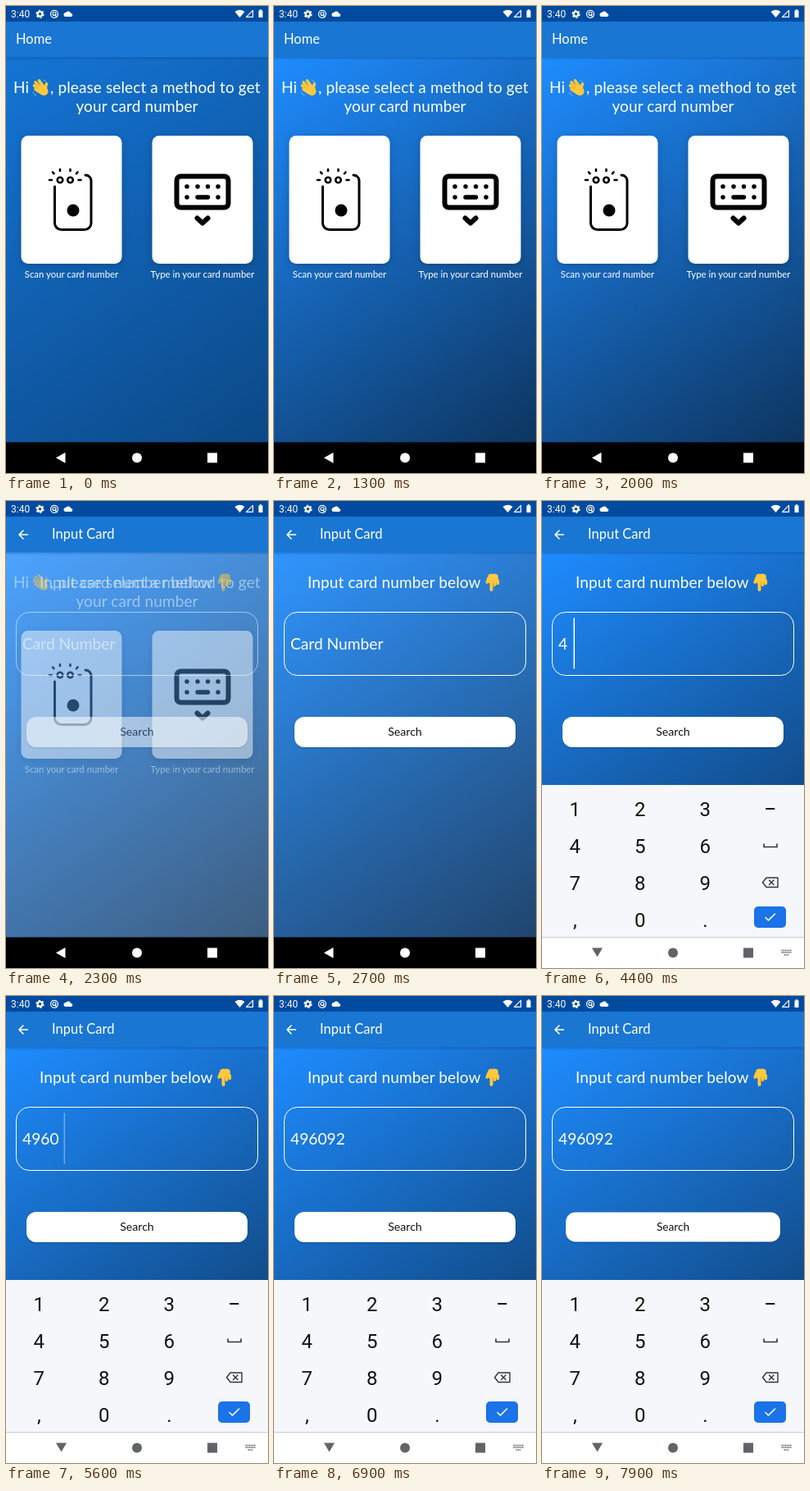
Animation of 320x569 px, one loop 8000 ms. Source, as an HTML page:

```html
<!DOCTYPE html>
<html lang="en">
<head>
<meta charset="utf-8">
<title>Card number input</title>
<style>
  html, body { margin: 0; height: 100%; overflow: hidden; background: #000; }
  svg { display: block; width: 100vw; height: 100vh; font-family: Lato, sans-serif; fill: #fff; }
  .line { fill: none; stroke-linecap: round; stroke-linejoin: round; }
  .title { font-size: 16.5px; }
  .big { font-size: 19px; letter-spacing: .12px; }
  .field { font-size: 19.2px; }
  .small { font-size: 11.4px; text-anchor: middle; }
  .status { font: 12px Roboto, sans-serif; }
  .keys { font: 24px Roboto, sans-serif; fill: #111; text-anchor: middle; }
  .shadow { filter: drop-shadow(0 2px 4px #0003); }
  .low { filter: drop-shadow(0 1px 1px #0003); }
</style>
</head>
<body>
<svg viewBox="0 0 320 569" preserveAspectRatio="none">
  <defs>
    <linearGradient id="sky" gradientUnits="userSpaceOnUse" x1="0" y1="62" x2="320" y2="531">
      <stop stop-color="#1e8cff"/><stop offset="1" stop-color="#0d3560"/>
    </linearGradient>
    <linearGradient id="edge" x2="0" y2="1">
      <stop stop-color="#003" stop-opacity=".2"/><stop offset="1" stop-color="#003" stop-opacity="0"/>
    </linearGradient>
  </defs>

  <rect y="62" width="320" height="470" fill="url(#sky)"/>
  <rect id="dim" y="62" width="320" height="470" fill="#0a5cab"/>
  <rect id="veil" y="62" width="320" height="470"/>

  <g id="home">
    <text class="big" x="9" y="105.5">Hi</text>
    <g class="line" stroke="#ffc83d" stroke-width="3.6">
      <path d="M45 102L36 93M47 100L40.5 91M43 104L34.5 97M43 106L36 101.5M48.5 102Q48 97 49.5 95"/>
      <path d="M45.5 103.5L46.5 104" stroke-width="10"/>
      <path d="M41 98L37.8 94.7M39.5 100.5L36.5 98" stroke="#e59600" stroke-width=".7"/>
      <path d="M46 90Q49 91 49.5 93M33 105Q34 108 37 109" stroke="#7fb5e8" stroke-width="1"/>
    </g>
    <text class="big" x="54" y="105.5">, please select a method to get</text>
    <text class="big" x="160" y="129" text-anchor="middle">your card number</text>
    <g class="shadow">
      <rect x="18.5" y="158" width="123" height="156" rx="8.5"/>
      <rect x="178.5" y="158" width="123" height="156" rx="8.5"/>
    </g>
    <g class="line" stroke="#000" stroke-width="3">
      <path d="M59.5 220V264.500a8 8 0 0 0 8 8H96a8 8 0 0 0 8-8V213a7 7 0 0 0-7-7"/>
      <g stroke-width="2.6">
        <circle cx="66" cy="212" r="3.3"/><circle cx="78.5" cy="212" r="3.3"/>
        <path d="M53 212h3M88.5 212h3M57 202.500l1.500 1.700M66 199v2M78.5 199v2M87.500 202.500l-1.500 1.700"/>
      </g>
    </g>
    <circle cx="82" cy="249" r="7.5" fill="#000"/>
    <g class="line" stroke="#000" stroke-width="6">
      <rect x="208.5" y="207.5" width="63" height="38" rx="5"/>
      <path d="M221 220h0M234 220h0M246.5 220h0M259 220h0M221 233h0M259 233h0M234 233h12.5" stroke-width="5.5"/>
      <path d="M233.5 258.5l6.5 6 6.5-6"/>
    </g>
    <text class="small" x="80" y="331">Scan your card number</text>
    <text class="small" x="240" y="331">Type in your card number</text>
  </g>

  <g id="input">
    <text class="big" x="41" y="105.5">Input card number below</text>
    <g class="line" stroke="#ffc83d" stroke-width="4">
      <path d="M265.5 95V108"/>
      <path d="M265 92.5H270V97H265Z" stroke-width="7.5"/>
      <path d="M269.5 99v3.3M273.3 97v3.5M262 94l-1.8 5" stroke-width="3.6"/>
      <path d="M267.6 99v4M271.5 99v3" stroke="#e59600" stroke-width=".7"/>
    </g>
    <rect x="12.5" y="135.5" width="295" height="77" rx="16" fill="none" stroke="#fff"/>
    <text class="field" id="value" x="20" y="180.5"></text>
    <rect id="cursor" width="1.5"/>
    <g id="search">
      <rect class="low" x="25" y="263" width="270" height="37" rx="12"/>
      <text x="160" y="286.3" font-size="14.1" fill="#111" text-anchor="middle">Search</text>
    </g>
  </g>

  <rect y="62" width="320" height="4" fill="url(#edge)"/>
  <rect width="320" height="19" fill="#004ba0"/>
  <rect y="19" width="320" height="43.5" fill="#1976d2"/>
  <text class="title" id="homeTitle" x="12" y="46.3">Home</text>
  <g id="inputTitle">
    <path class="line" d="M26.5 41H16M21 36l-5 5 5 5" stroke="#fff" stroke-width="1.6"/>
    <text class="title" x="56" y="46.3">Input Card</text>
  </g>
  <text class="status" x="6" y="14">3:40</text>
  <g class="line" stroke="#fff">
    <circle cx="41.5" cy="9.8" r="2.8" stroke-width="2.2"/>
    <circle cx="41.5" cy="9.8" r="4.4" stroke-width="1.5" stroke-linecap="butt" stroke-dasharray="2.3"/>
    <circle cx="59" cy="9.8" r="4.5" stroke-width="1.2"/>
    <circle cx="59" cy="9.5" r="2" stroke-width="1.2"/>
    <path d="M60 11l2 2.5" stroke-width="1.3"/>
    <path d="M293.5 13.3h8V5.3z" stroke-width="1.2"/>
  </g>
  <path d="M73 13a2.5 2.5 0 0 1 0-5 3.5 3.5 0 0 1 6.3 1 2 2 0 0 1 0 4zM279.5 7q6-4.5 12 0l-6 7zM308.5 5.5h1.3v-1.2h2.4v1.2h1.3V14h-5z"/>

  <g id="keyboard">
    <rect y="346" width="320" height="190" fill="#f5f7fa"/>
    <g class="keys" id="keys"></g>
    <g class="line" stroke="#333" stroke-width="1.6">
      <path d="M274 375h9.5" stroke="#111" stroke-width="2"/>
      <path d="M271 418v3.5h16V418"/>
      <path d="M274 459h14v11.5h-14l-4.5-5.75zM277.5 462l5.5 5.5M283 462l-5.5 5.5" stroke-width="1.4"/>
    </g>
    <rect x="259" y="494" width="39" height="26" rx="5" fill="#1a73e8"/>
    <path class="line" d="M273 507.5l3.5 3.5 8-8" stroke="#fff" stroke-width="1.6"/>
  </g>

  <rect y="531.5" width="320" height="38" fill="#000"/>
  <path d="M61 550.5l11.5-6.5v13z"/>
  <circle cx="160" cy="550.5" r="6"/><rect x="246" y="544.5" width="12" height="12"/>
  <g id="lightNav" fill="#606468">
    <rect y="531.5" width="320" height="38" fill="#fff"/>
    <path d="M0 532H320" stroke="#e4e6e9"/>
    <path d="M61 544.5h13l-6.5 11z"/>
    <circle cx="160" cy="550.5" r="6"/><rect x="246" y="544.5" width="12" height="12"/>
    <path d="M292.5 547.5h12M292.5 550h12M295.5 553h6" fill="none" stroke="#606468" stroke-width="1.5" stroke-dasharray="1.5 .6"/>
  </g>
</svg>
<script>
const el = id => document.getElementById(id);
const clamp = v => Math.max(0, Math.min(1, v));
const ramp = (t, start, length) => clamp((t - start) / length);
const set = (id, attrs) => { for (const k in attrs) el(id).setAttribute(k, attrs[k]); };
const fade = (id, opacity) => set(id, { opacity });

const LOOP = 8000, LEAVE = 2100, FOCUS = 2705, KEYBOARD = 2900, PRESS = 7780;
const DIGITS = '496092', KEY_TIMES = [4150, 4450, 4780, 5100, 5950, 6350];

el('keys').innerHTML = [...'123456789,0.'].map((key, i) =>
  `<text x="${40.3 + i % 3 * 79.5}" y="${383.5 + Math.floor(i / 3) * 45}">${key}</text>`).join('');

function drawField(t) {
  const typed = KEY_TIMES.filter(k => k <= t).length;
  el('value').textContent = typed ? DIGITS.slice(0, typed) : 'Card Number';
  const phase = (t - (typed ? KEY_TIMES[typed - 1] : FOCUS)) % 1000;
  set('cursor', {
    x: typed ? 27.8 + typed * 10.7 : 20,
    y: typed ? 142.5 : 161,
    height: typed ? 62 : 26,
    opacity: t < FOCUS ? 0 : 1 - ramp(phase, 440, 100) + ramp(phase, 900, 100)
  });
}

function draw(t) {
  fade('dim', .5 * (1 - ramp(t, 0, 700)));
  fade('veil', .2 * (ramp(t, LEAVE, 200) - ramp(t, LEAVE + 200, 650)));
  fade('home', 1 - ramp(t, LEAVE, 380));
  fade('input', ramp(t, LEAVE, 380));
  fade('homeTitle', 1 - ramp(t, LEAVE, 120));
  fade('inputTitle', ramp(t, LEAVE, 180));
  drawField(t);

  const rise = ramp(t, KEYBOARD, 370);
  const shown = clamp(rise * 1.15);
  set('keyboard', { transform: `translate(0 ${223 * (1 - rise) ** 3})`, opacity: shown });
  fade('lightNav', shown);

  const scale = 1 - .03 * ramp(t, PRESS, 100);
  set('search', { transform: `translate(160 281.5) scale(${scale}) translate(-160 -281.5)` });
}

function tick() {
  draw(performance.now() % LOOP);
  requestAnimationFrame(tick);
}
tick();
</script>
</body>
</html>
```
